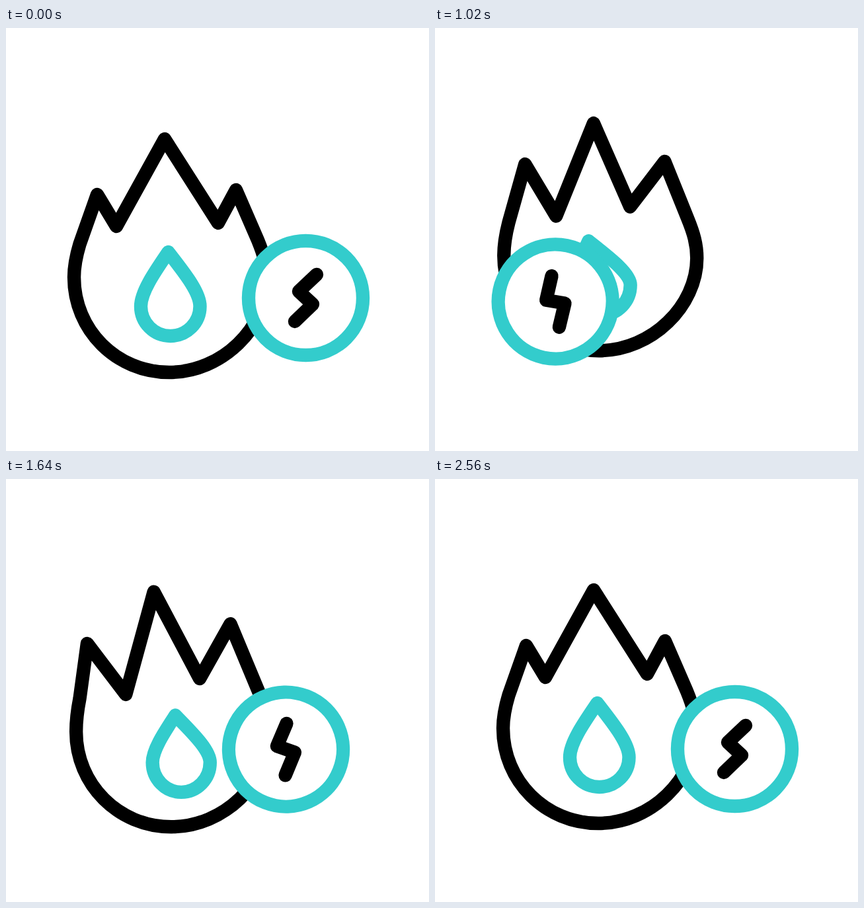
Write an HTML page that moves like this. It is 640 px wide and 640 px high and loops after 2820 ms.

```html
<!DOCTYPE html>
<html lang="en">
<head>
<meta charset="utf-8">
<title>Gas and power</title>
<style>
  html, body { margin: 0; width: 100%; height: 100%; overflow: hidden; background: #fff; }
  svg { display: block; width: 640px; height: 640px; }
  path, circle { fill: none; stroke: #000; stroke-width: 20.4; stroke-linecap: round; stroke-linejoin: round; }
  .teal { stroke: #33cccc; }
</style>
</head>
<body>
<svg viewBox="0 0 640 640">
  <path id="flame"/>
  <path id="drop" class="teal"/>
  <g id="coin">
    <circle r="86.5" class="teal" style="fill:#fff"/>
    <path d="M16.5-35.5L-10.5-10L10.5 9.5L-16.5 35.5"/>
    <path id="flash" class="teal" pathLength="1" d="M16.5-35.5L-10.5-10L10.5 9.5L-16.5 35.5"/>
  </g>
</svg>
<script>
const LOOP = 2820;

// tips: five zigzag corners, body: shift of the round part,
// drop: tip x, tip y, left, right, bottom
const rest = { tips: [138, 252, 167, 300, 240, 168, 321, 295, 348, 245], body: [0, 0], drop: [245.5, 339, 204, 293.5, 466] };
const rise = { tips: [140, 189, 184, 270, 246, 131, 297, 260, 352, 193], body: [0, -45], drop: [226, 311, 205, 291, 421] };
const dip = { tips: [119, 284, 180, 351, 212, 204, 287, 318, 327, 243], body: [7, 23], drop: [261, 374, 229, 317, 492] };
const peak = { tips: [128, 203, 183, 293, 239, 127, 301, 281, 356, 188], body: [-2, -18], drop: [250, 336, 212, 298, 450] };

const $ = id => document.getElementById(id);
const mix = (a, b, k) => a + (b - a) * k;
const smooth = k => k * k * (3 - 2 * k);
const settle = k => smooth(1 - (1 - k) ** 2);
const span = (t, from, to) => Math.min(1, Math.max(0, (t - from) / (to - from)));
const ease = (t, from, to) => smooth(span(t, from, to));

const MOVES = [
  { from: 320, to: 890, a: rest, b: rise, curve: smooth },
  { from: 890, to: 1375, a: rise, b: dip, curve: smooth },
  { from: 1375, to: 1960, a: dip, b: peak, curve: smooth },
  { from: 1960, to: 2480, a: peak, b: rest, curve: settle }
];

function poseAt(t) {
  const { from, to, a, b, curve } = MOVES.find(m => t < m.to) || MOVES[MOVES.length - 1];
  const k = curve(span(t, from, to));
  const blend = part => a[part].map((v, i) => mix(v, b[part][i], k));
  return { tips: blend('tips'), body: blend('body'), drop: blend('drop') };
}

function flamePath({ tips, body: [dx, dy] }) {
  const at = (x, y) => `${x + dx} ${y + dy} `;
  const shoulder = `111.5 ${327 + dy}`;
  return `M${shoulder}L${tips.join(' ')} L${at(381, 321)}`
    + `C${at(390, 343)}${at(395, 360)}${at(395, 381)}`
    + `C${at(395, 453)}${at(327, 521)}${at(247, 521)}`
    + `C${at(167, 521)}${at(103, 457)}${at(103, 377)}`
    + `C${at(103, 357)}${107 + dx / 2} ${342 + dy} ${shoulder}Z`;
}

function dropPath({ drop: [x, y, l, r, b] }) {
  const side = b - 45, mid = (l + r) / 2, k = (r - l) * 0.276, low = b - 20;
  const y1 = mix(y, side, 0.35), y2 = mix(side, y, 0.27);
  return `M${x} ${y}C${mix(x, r, 0.46)} ${y1} ${r} ${y2} ${r} ${side}`
    + `C${r} ${low} ${mid + k} ${b} ${mid} ${b}`
    + `C${mid - k} ${b} ${l} ${low} ${l} ${side}`
    + `C${l} ${y2} ${mix(x, l, 0.47)} ${y1} ${x} ${y}Z`;
}

function draw(t) {
  const pose = poseAt(t);
  $('flame').setAttribute('d', flamePath(pose));
  $('drop').setAttribute('d', dropPath(pose));

  const roll = ease(t, 312, 977) - ease(t, 977, 1813);
  $('coin').setAttribute('transform',
    `translate(${453.5 - 273.5 * roll} ${408.5 + 5.5 * roll}) rotate(${-215 * roll})`);

  // A teal streak runs down the bolt and off its end
  const head = ease(t, 2020, 2320), tail = ease(t, 2220, 2520), flash = $('flash').style;
  flash.visibility = head - tail > 0.001 ? 'visible' : 'hidden';
  flash.strokeDasharray = `${head - tail} 2`;
  flash.strokeDashoffset = -tail;
}

const start = performance.now();
function tick() {
  draw((performance.now() - start) % LOOP);
  requestAnimationFrame(tick);
}
tick();
</script>
</body>
</html>
```
